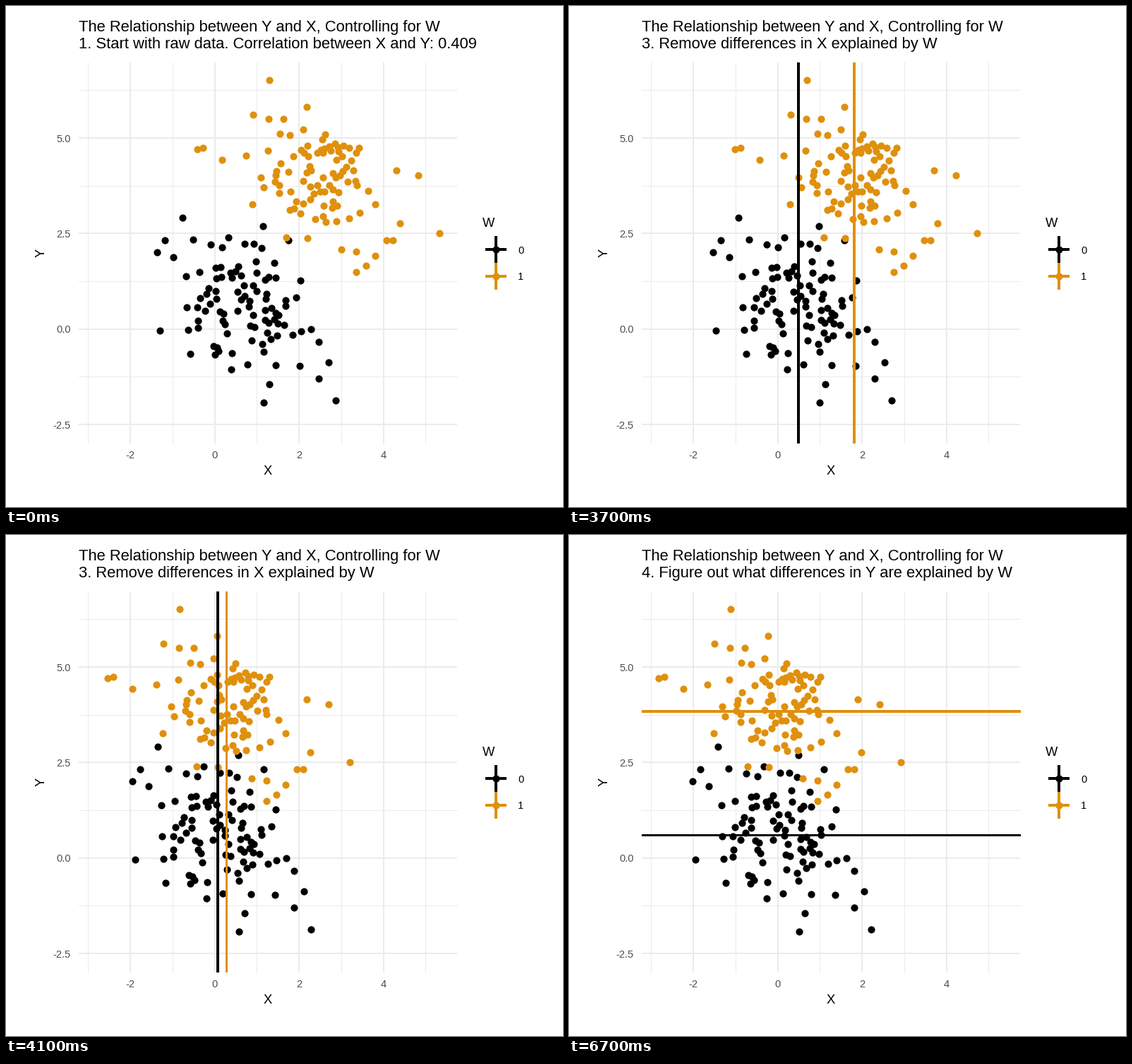
A matplotlib script for the animation above (8 s loop, 789x710 px).

```python
import math
import random

import matplotlib.pyplot as plt
from matplotlib.animation import FuncAnimation

WIDTH, HEIGHT, DPI = 789, 710, 100
LEFT, RIGHT, TOP, BOTTOM = 103, 639.4, 80.4, 619.6
BLACK, ORANGE, GRID = "#000000", "#DF900C", "#EBEBEB"
DOT, RULE = 10.2, 2.67
PT = 72 / DPI  # points per pixel

plt.rcParams["font.family"] = "Liberation Sans"


def px(x):
    return 295.7 + 59.76 * x


def py(y):
    return 457.8 - 54.13 * y


MEAN_X = (0.660, 2.41)
MEAN_Y = (0.595, 3.84)

# Outlying observations in stage pixels; the dense middles are sampled.
OUTER_0 = [
    (250, 300), (225, 332), (214, 349), (237, 356), (218, 460), (265, 331),
    (290, 338), (306, 342), (315, 328), (338, 337), (351, 337), (362, 343),
    (364, 312), (400, 332), (380, 364), (255, 383), (274, 377), (256, 427),
    (258, 459), (261, 493), (296, 494), (319, 515), (342, 508), (373, 536),
    (365, 562), (382, 509), (416, 510), (443, 528), (467, 559), (457, 505),
    (443, 476), (432, 458), (417, 389), (411, 413), (418, 461), (406, 466),
]
OUTER_1 = [
    (373, 105), (350, 154), (372, 160), (393, 160), (426, 143), (271, 203),
    (279, 201), (306, 218), (340, 212), (349, 281), (361, 243), (365, 257),
    (371, 205), (388, 181), (402, 183), (421, 175), (452, 182), (460, 205),
    (486, 201), (500, 201), (476, 213), (553, 233), (584, 240), (614, 322),
    (558, 308), (548, 332), (539, 332), (523, 354), (510, 368), (496, 377),
    (496, 348), (475, 345), (486, 301), (501, 293), (523, 281), (427, 329),
    (397, 328), (462, 286),
]


def fill_middle(points, center, radii, skew, seed, total=100, gap=5):
    """Add sampled points inside an ellipse until the group is complete."""
    rng = random.Random(seed)
    points = list(points)
    while len(points) < total:
        u = 2 * rng.random() ** skew - 1
        v = rng.uniform(-1, 1)
        spot = (center[0] + radii[0] * u, center[1] + radii[1] * v)
        if u * u + v * v < 1 and all(math.dist(spot, p) > gap for p in points):
            points.append(spot)
    return points


groups = (
    fill_middle(OUTER_0, (332, 428), (66, 72), 1.0, 4),
    fill_middle(OUTER_1, (448, 249), (67, 62), 1.25, 9),
)

fig = plt.figure(figsize=(WIDTH / DPI, HEIGHT / DPI), dpi=DPI, facecolor="white")
ax = fig.add_axes([0, 0, 1, 1])
ax.set(xlim=(0, WIDTH), ylim=(HEIGHT, 0))
ax.axis("off")


def line(xs, ys, color, width, z, snap=False):
    return ax.plot(xs, ys, color=color, lw=width * PT, zorder=z, snap=snap,
                   antialiased=False, solid_capstyle="butt")[0]


def vline(x, color, width=RULE, z=4, snap=False):
    return line([x, x], [TOP, BOTTOM], color, width, z, snap)


def hline(y, color, width=RULE, z=4, snap=False):
    return line([LEFT, RIGHT], [y, y], color, width, z, snap)


def dots(points, color, z=3):
    return ax.scatter(*zip(*points), s=(DOT * PT) ** 2, c=color,
                      linewidths=0, zorder=z)


def label(x, y, text, size, color=BLACK, ha="left", **extra):
    extra.setdefault("va", "baseline")
    return ax.text(x, y, text, size=size * PT, color=color, ha=ha, **extra)


# Panel grid and axis labels
for x in (-3, -1, 1, 3, 5):
    vline(px(x), GRID, 1, 1, True)
for y in (-1.25, 1.25, 3.75, 6.25):
    hline(py(y), GRID, 1, 1, True)
for x in (-2, 0, 2, 4):
    vline(px(x), GRID, 2, 2, True)
    label(px(x), 641, str(x), 14.67, "#4D4D4D", "center")
for y in (-2.5, 0.0, 2.5, 5.0):
    hline(py(y), GRID, 2, 2, True)
    label(92, py(y) + 5.4, f"{y:.1f}", 14.67, "#4D4D4D", "right")
label(371, 663.5, "X", 18.33, ha="center")
label(50, 349.8, "Y", 18.33, ha="center", va="center", rotation=90)

# Legend
label(675, 313.3, "W", 18.33)
for name, y, color in (("0", 345.2, BLACK), ("1", 383.1, ORANGE)):
    line([694, 694], [y - 18.9, y + 18.9], color, RULE, 4)
    line([679.3, 708.7], [y, y], color, RULE, 4)
    dots([(694, y)], color, 5)
    label(725, y + 5.4, name, 14.67)

label(103, 36.4, "The Relationship between Y and X, Controlling for W", 22)
subtitle = label(103, 60.2, "", 22)

colors = (BLACK, ORANGE)
clouds = [dots(points, color) for points, color in zip(groups, colors)]
x_rules = [vline(px(m), color) for m, color in zip(MEAN_X, colors)]
y_rules = [hline(py(m), color) for m, color in zip(MEAN_Y, colors)]

STEPS = (
    (64, "4. Figure out what differences in Y are explained by W"),
    (35, "3. Remove differences in X explained by W"),
    (5, "2. Figure out what differences in X are explained by W"),
    (0, "1. Start with raw data. Correlation between X and Y: 0.409"),
)


def update(frame):
    subtitle.set_text(next(text for start, text in STEPS if frame >= start))
    t = min(max((frame - 34) / 9, 0), 1)
    eased = (1 - math.cos(math.pi * t)) / 2
    for points, mean, cloud, rule in zip(groups, MEAN_X, clouds, x_rules):
        shift = (px(mean) - px(0)) * eased
        cloud.set_offsets([(x - shift, y) for x, y in points])
        rule.set_xdata([px(mean) - shift] * 2)
        rule.set_visible(8 <= frame < 64)
    for rule in y_rules:
        rule.set_visible(frame >= 67)
    return [subtitle, *clouds, *x_rules, *y_rules]


anim = FuncAnimation(fig, update, frames=80, interval=100, repeat=True,
                     repeat_delay=0)
plt.show()
```
